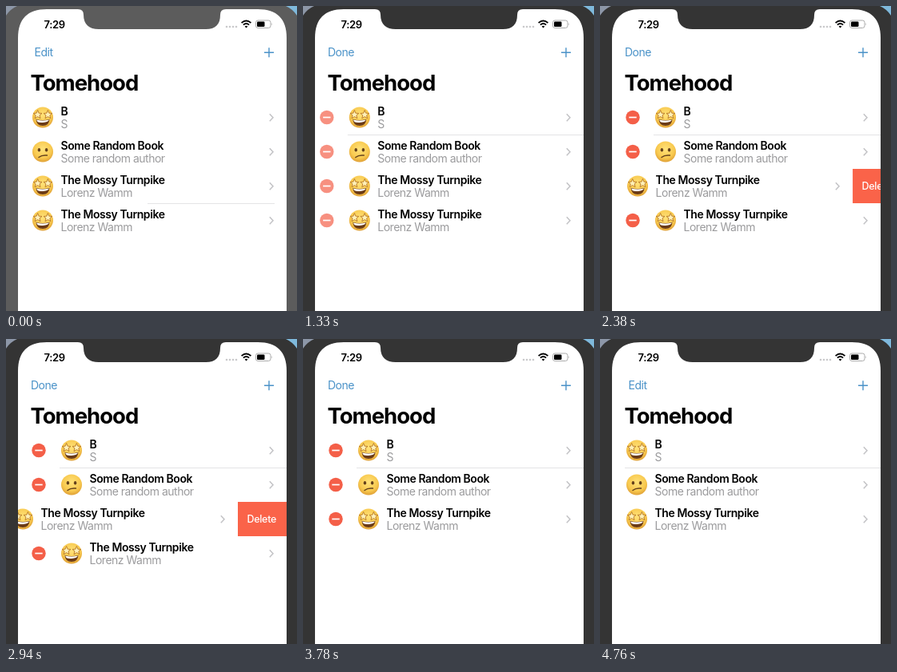
These frames come from a looping animation (364 px wide and 382 px high, 4830 ms). An HTML page:

```html
<!DOCTYPE html>
<html lang="en">
<head>
<meta charset="utf-8">
<title>Book list</title>
<style>
html, body { margin: 0; width: 100%; height: 100%; overflow: hidden; background: #fff; }
svg { display: block; }
text { font-family: Inter, "Open Sans", sans-serif; font-size: 14px; letter-spacing: -.035em; }
.head { font-weight: 600; letter-spacing: -.03em; }
.sub { fill: #9b9b9d; }
.btn { fill: #4a92c8; }
.line { stroke: #e4e4e6; stroke-width: 1; }
</style>
</head>
<body>
<svg width="364" height="382" viewBox="0 0 364 382">
  <defs>
    <radialGradient id="skin" cx=".5" cy=".38" r=".65">
      <stop offset="0" stop-color="#ffe27a"/>
      <stop offset=".65" stop-color="#f8c94f"/>
      <stop offset="1" stop-color="#dc9a32"/>
    </radialGradient>
    <path id="star" d="M0-5.6 1.5-1.9 5.4-1.7 2.4.8 3.4 4.6 0 2.5-3.4 4.6-2.4.8-5.4-1.7-1.5-1.9Z"
      fill="#fff0b8" stroke="#b87822" stroke-width=".9" stroke-linejoin="round"/>
    <g id="starry">
      <circle r="13" fill="url(#skin)"/>
      <path d="M-8.5 2.2Q0 4.6 8.5 2.2Q8 10.4 0 10.4T-8.5 2.2Z" fill="#6b3b17"/>
      <path d="M-7.8 2.9Q0 5 7.8 2.9Q7.4 5.8 0 6.4T-7.8 2.9Z" fill="#fff"/>
      <use href="#star" x="-6.4" y="-3.4"/>
      <use href="#star" x="6.4" y="-3.4"/>
    </g>
    <g id="unsure">
      <circle r="13" fill="url(#skin)"/>
      <ellipse cx="-4.6" cy="-2.2" rx="1.7" ry="2.3" fill="#64411c"/>
      <ellipse cx="4.6" cy="-2.2" rx="1.7" ry="2.3" fill="#64411c"/>
      <path d="M-5 7Q-1 3.8 5.4 4.6" fill="none" stroke="#64411c" stroke-width="1.5" stroke-linecap="round"/>
    </g>
    <clipPath id="screen"><rect x="15" y="4" width="336" height="378"/></clipPath>
    <clipPath id="slot"><rect id="slotBox" x="15" y="204" width="336" height="43"/></clipPath>
  </defs>

  <rect width="364" height="382" fill="#fff"/>
  <g clip-path="url(#screen)">
    <g id="lines"></g>
    <g id="rows"></g>
  </g>

  <path id="bezel" fill-rule="evenodd" d="M0 0H364V382H0Z
    M15 382V40C15 16 27 4 51 4H90Q97 4 97 11C97 23 104 29 116 29H250
    C262 29 268 23 268 11Q268 4 275 4H315C339 4 351 16 351 40V382Z"/>
  <path d="M0 0H14Q5 4 0 12Z" fill="#8d97a8"/>
  <path d="M350 0H364V12Q359 4 350 0Z" fill="#7fb9dc"/>

  <text class="head" x="47.5" y="27.5" style="font-size:13px">7:29</text>
  <g fill="#c9c9cb">
    <circle cx="276" cy="26" r="1.3"/><circle cx="280" cy="26" r="1.3"/>
    <circle cx="284" cy="26" r="1.3"/><circle cx="288" cy="26" r="1.3"/>
  </g>
  <g fill="none" stroke="#000" stroke-width="1.9">
    <path d="M294.6 21.1Q300.5 15.8 306.4 21.1M296.9 23.6Q300.5 20.4 304.1 23.6"/>
    <path d="M300.5 27.4 298.6 25.4Q300.5 24 302.4 25.4Z" fill="#000" stroke="none"/>
  </g>
  <rect x="312.5" y="18" width="18.5" height="9.5" rx="2.6" fill="none" stroke="#aaa"/>
  <rect x="314" y="19.5" width="9.5" height="6.5" rx="1.3"/>
  <path d="M332.3 21.2Q334 22.7 332.3 24.3Z" fill="#aaa"/>

  <text id="edit" class="btn" x="35.5" y="63.3">Edit</text>
  <text id="done" class="btn" x="31" y="63.3">Done</text>
  <path d="M323 58.2H335M329 52.2V64.2" stroke="#4a92c8" stroke-width="1.4"/>
  <text x="30.5" y="105.5" style="font-size:27.5px;font-weight:700;letter-spacing:-1px">Tomehood</text>
</svg>

<script>
const LOOP = 4830, STEP = 70, TOP = 118, PITCH = 43, INSET = 36, SWIPE = 61;
const books = [
  ['B', 'S', 'starry'],
  ['Some Random Book', 'Some random author', 'unsure'],
  ['The Mossy Turnpike', 'Lorenz Wamm', 'starry'],
  ['The Mossy Turnpike', 'Lorenz Wamm', 'starry']
];
const byId = id => document.getElementById(id);

function add(parent, tag, attrs = {}, text = '') {
  const el = document.createElementNS('http://www.w3.org/2000/svg', tag);
  for (const key in attrs) el.setAttribute(key, attrs[key]);
  el.textContent = text;
  return parent.appendChild(el);
}

function makeRow([title, author, face], i) {
  const outer = add(byId('rows'), 'g', i === 2 ? { 'clip-path': 'url(#slot)' } : {});
  const row = add(outer, 'g');
  const body = add(row, 'g');
  const minus = add(body, 'g');
  add(minus, 'circle', { cx: 5, cy: 21.5, r: 8.7, fill: '#f45f48' });
  add(minus, 'path', { d: 'M0.3 21.5H9.7', stroke: '#fff', 'stroke-width': 1.7 });
  add(body, 'use', { href: '#' + face, x: 46, y: 21.5 });
  add(body, 'text', { class: 'head', x: 68.5, y: 18.8 }, title);
  add(body, 'text', { class: 'sub', x: 68.5, y: 35.2 }, author);
  const arrow = add(row, 'path', {
    d: 'M329.8 17.3 334 21.8 329.8 26.3', fill: 'none', stroke: '#c3c3c6', 'stroke-width': 1.5
  });
  return { outer, row, body, minus, arrow };
}

const rows = books.map(makeRow);
const trash = add(rows[2].outer, 'g');
add(trash, 'rect', { y: 204, width: SWIPE + 2, height: PITCH, fill: '#fa6349' });
add(trash, 'text', {
  x: 11.5, y: 230, fill: '#fff', style: 'font-size:12.5px;font-weight:500;letter-spacing:-.3px'
}, 'Delete');

const line = () => add(byId('lines'), 'line', { class: 'line', x2: 351 });
const topLine = line(), lowLine = line(), spareLine = line();

function placeLine(el, x, y, opacity) {
  el.setAttribute('x1', x);
  el.setAttribute('y1', y + .5);
  el.setAttribute('y2', y + .5);
  el.style.opacity = opacity;
}

// Smooth 0..1 ramp
function ramp(t, start, length = 350) {
  const p = Math.min(1, Math.max(0, (t - start) / length));
  return p * p * (3 - 2 * p);
}

const move = (el, x, y = 0) => el.setAttribute('transform', `translate(${x} ${y})`);

function draw(t) {
  const editing = ramp(t, 1110) - ramp(t, 4102);
  const shift = INSET * editing;
  const swipe = SWIPE * (ramp(t, 2188) - ramp(t, 3140));
  const height = PITCH * (1 - ramp(t, 3076));

  rows.forEach((r, i) => {
    const y = TOP + PITCH * i - (i === 3 ? PITCH - height : 0);
    move(r.row, i === 2 ? -swipe : 0, y);
    move(r.body, shift);
    r.minus.style.opacity = editing;
  });
  byId('slotBox').setAttribute('height', height);
  rows[2].outer.style.display = height > .1 ? '' : 'none';
  move(trash, 351 - swipe);
  trash.style.display = swipe > .1 ? '' : 'none';

  const started = t >= 980;
  const removing = ramp(t, 3076, 150) - ramp(t, 3430, 140);
  const lowY = 203 + height + PITCH;
  placeLine(topLine, 31 + shift, 161, started ? 1 : 0);
  placeLine(lowLine, started ? 31 : 177, started ? lowY : 247, started ? removing : 1);
  lowLine.setAttribute('x2', started ? 351 : 336);
  placeLine(spareLine, 31, lowY + PITCH, removing);

  const inEdit = t >= 1110 && t < 4102;
  byId('edit').style.opacity = inEdit ? 0
    : t >= 4102 ? ramp(t, 4102, 200) : 1 - .6 * ramp(t, 960, 70);
  byId('done').style.opacity = inEdit ? ramp(t, 1110, 200) * (1 - .6 * ramp(t, 3970, 70)) : 0;
  byId('bezel').setAttribute('fill', started ? '#343434' : '#5c5c5c');
}

const begin = performance.now();
function tick() {
  const t = (performance.now() - begin) % LOOP;
  draw(Math.floor(t / STEP) * STEP);
  requestAnimationFrame(tick);
}
tick();
</script>
</body>
</html>
```
